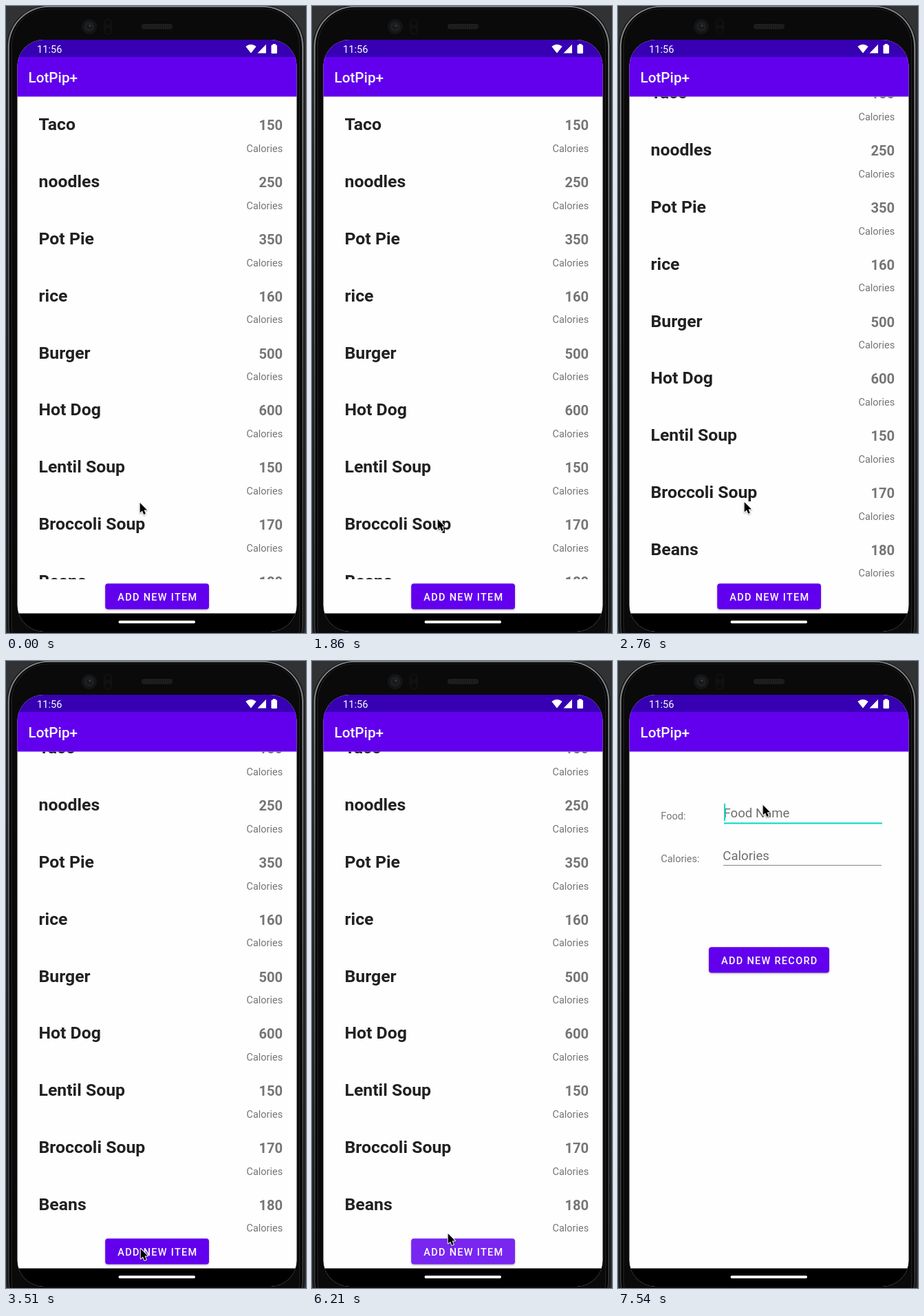
An HTML page with a canvas that plays this animation: 436x910 px, repeating every 7990 ms.

```html
<!DOCTYPE html>
<html lang="en">
<head>
<meta charset="utf-8">
<title>Calorie list</title>
<style>
html, body { margin: 0; width: 100%; height: 100%; overflow: hidden; background: #303234; }
canvas { display: block; width: 436px; height: 910px; }
</style>
</head>
<body>
<canvas id="stage"></canvas>
<script>
const W = 436, H = 910, LOOP = 7990;
const PURPLE = '#6200ee', GREY = '#757575', TEAL = '#03dac5';
const canvas = document.getElementById('stage');
const ctx = canvas.getContext('2d');
const dpr = window.devicePixelRatio || 1;
canvas.width = W * dpr;
canvas.height = H * dpr;

const foods = [
  ['Taco', 150], ['noodles', 250], ['Pot Pie', 350], ['rice', 160], ['Burger', 500],
  ['Hot Dog', 600], ['Lentil Soup', 150], ['Broccoli Soup', 170], ['Beans', 180]
];
const ROW = 82.8, LIST_TOP = 131.5, LIST_END = 832, MAX_SCROLL = 46, MAX_STRETCH = .0088;
const STEP = 150, PRESS_AT = 4560, RELEASE_AT = 5460, FORM_AT = 6350, FOCUS_AT = 7540;

// Turning points of the pointer: time, x, y
const stops = [
  [210, 195, 721], [810, 207, 547], [1110, 207, 547], [1560, 188, 670], [1860, 183, 745],
  [2160, 181, 690], [2310, 181, 690], [2460, 181, 687], [3510, 196, 853], [5310, 196, 853],
  [6210, 198, 831], [6500, 188, 705], [6650, 188, 705], [7240, 211, 209]
];

// Eased 0..1 between two times
function ramp(t, from, to) {
  const p = Math.min(1, Math.max(0, (t - from) / (to - from)));
  return p * p * (3 - 2 * p);
}

function stepped(t) {
  const phase = t < FORM_AT ? 60 : 50;
  return Math.floor((t - phase) / STEP) * STEP + phase;
}

function pointerAt(t) {
  let [from, x, y] = stops[0];
  for (const [to, nx, ny] of stops.slice(1)) {
    if (t <= from) break;
    const p = ramp(t, from, to);
    x += (nx - x) * p;
    y += (ny - y) * p;
    from = to;
  }
  return [x, y];
}

function rect(x, y, w, h, color) {
  ctx.fillStyle = color;
  ctx.fillRect(x, y, w, h);
}

function round(x, y, w, h, r, color) {
  ctx.beginPath();
  ctx.roundRect(x, y, w, h, r);
  ctx.fillStyle = color;
  ctx.fill();
}

function disc(x, y, r, color) {
  round(x - r, y - r, 2 * r, 2 * r, r, color);
}

function poly(points, color) {
  ctx.beginPath();
  points.forEach(([x, y]) => ctx.lineTo(x, y));
  ctx.closePath();
  ctx.fillStyle = color;
  ctx.fill();
}

function text(str, x, y, size, weight, color, align = 'left', spacing = 0) {
  ctx.font = `${weight} ${size}px Roboto, sans-serif`;
  ctx.letterSpacing = spacing + 'px';
  ctx.textAlign = align;
  ctx.fillStyle = color;
  ctx.fillText(str, x, y);
}

function drawPhone() {
  rect(0, 0, W, H, '#303234');
  const metal = ctx.createLinearGradient(0, 0, 0, H);
  metal.addColorStop(0, '#85878a');
  metal.addColorStop(.12, '#6c6e70');
  metal.addColorStop(.5, '#4a4b4d');
  metal.addColorStop(1, '#2c2d2e');
  const shell = (inset, color) =>
    round(1 + inset, inset * .7 - 1, 433 - 2 * inset, 960 - 1.4 * inset, 61 - inset, color);
  shell(0, '#111213');
  shell(1.5, metal);
  shell(4, '#000');
  shell(6.5, '#2a2b2c');
  shell(7.5, '#0a0a0b');

  disc(121, 30, 11, '#141516');
  disc(121, 30, 7, '#1e2022');
  disc(121, 30, 4, '#17191b');
  disc(122, 28.5, 1.8, '#33373b');
  round(142, 18, 12, 24, 6, '#111112');
  disc(148, 24, 4, '#0b0b0c');
  disc(148, 36, 4, '#0b0b0c');
  round(197, 26, 45, 7.5, 3.7, '#1f2021');
  for (let x = 200; x < 240; x += 3) rect(x, 27, 1, 5.5, '#161617');
}

function drawStatus() {
  rect(16, 49, 407, 25, '#3700b3');
  text('11:56', 45, 68, 14.6, 400, '#fff');
  ctx.beginPath();
  ctx.moveTo(356, 68.5);
  ctx.lineTo(348.3, 58.8);
  ctx.quadraticCurveTo(356, 52.6, 363.7, 58.8);
  ctx.fillStyle = '#fff';
  ctx.fill();
  poly([[365.5, 68.5], [378, 68.5], [378, 55.8]], '#fff');
  round(385.5, 56.5, 8.5, 12.5, 1.2, '#fff');
  rect(387.8, 55, 4, 2, '#fff');
}

function drawList(t) {
  const scroll = MAX_SCROLL * ramp(t, 1860, 2160);
  const stretch = MAX_STRETCH * ramp(t, 2010, 2460) * (1 - ramp(t, 2460, 2760));
  ctx.save();
  ctx.beginPath();
  ctx.rect(16, LIST_TOP, 407, LIST_END - LIST_TOP);
  ctx.clip();
  ctx.translate(0, LIST_END);
  ctx.scale(1, 1 + stretch);
  ctx.translate(0, -LIST_END - scroll);
  foods.forEach(([name, kcal], i) => {
    const y = i * ROW;
    text(name, 47.5, 180.4 + y, 24.8, 700, '#212121');
    text(kcal, 402.2, 180.4 + y, 20.2, 700, GREY, 'right');
    text('Calories', 402.2, 212 + y, 14.5, 400, GREY, 'right');
  });
  ctx.restore();
}

// Light spreading over a pressed button
function pressGlow(t) {
  if (t >= RELEASE_AT) return 'rgba(255,255,255,.15)';
  if (t >= PRESS_AT + STEP) return 'rgba(255,255,255,.2)';
  const glow = ctx.createRadialGradient(212, 857, 0, 212, 857, 86);
  glow.addColorStop(0, 'rgba(255,255,255,.22)');
  glow.addColorStop(.55, 'rgba(255,255,255,.2)');
  glow.addColorStop(1, 'rgba(255,255,255,.08)');
  return glow;
}

function drawButton(x, y, w, label, glow) {
  const h = 37.3;
  ctx.save();
  ctx.shadowColor = 'rgba(0,0,0,.28)';
  ctx.shadowBlur = 3 * dpr;
  ctx.shadowOffsetY = 1.2 * dpr;
  round(x, y, w, h, 4, PURPLE);
  ctx.restore();
  if (glow) round(x, y, w, h, 4, glow);
  text(label, x + w / 2 + .8, y + 24.3, 14.5, 500, '#fff', 'center', 1.3);
}

function drawForm(focused) {
  text('Food:', 62.3, 230.3, 14.5, 400, GREY);
  text('Calories:', 62.3, 291.6, 14.5, 400, GREY);
  text('Food Name', 153.5, 227, 18.6, 400, '#6e6e6e');
  text('Calories', 152.3, 289, 18.6, 400, '#6e6e6e');
  if (focused) {
    rect(154, 234.5, 230, 2, TEAL);
    rect(154, 207, 2, 25, TEAL);
  } else {
    rect(154, 235, 230, 1, '#858585');
  }
  rect(153, 296, 230, 1, '#858585');
  drawButton(132, 415.2, 175, 'ADD NEW RECORD');
}

function drawPointer(x, y) {
  ctx.save();
  ctx.translate(x - .3, y);
  ctx.beginPath();
  [[0, 0], [0, 14.6], [3.3, 11.5], [5.6, 16.9], [8.2, 15.8], [5.9, 10.6], [10.3, 10.4]]
    .forEach(([px, py]) => ctx.lineTo(px, py));
  ctx.closePath();
  ctx.lineJoin = 'round';
  ctx.lineWidth = 2;
  ctx.strokeStyle = '#fff';
  ctx.shadowColor = 'rgba(0,0,0,.35)';
  ctx.shadowBlur = 2 * dpr;
  ctx.shadowOffsetY = dpr;
  ctx.stroke();
  ctx.shadowColor = 'transparent';
  ctx.fillStyle = '#000';
  ctx.fill();
  ctx.restore();
}

function draw(t) {
  const tick = stepped(t);
  ctx.setTransform(dpr, 0, 0, dpr, 0, 0);
  drawPhone();
  ctx.save();
  ctx.beginPath();
  ctx.roundRect(16.5, 49, 406, 859, 38);
  ctx.clip();
  rect(16, 49, 407, 860, '#fefefe');
  drawStatus();
  rect(16, 74, 407, LIST_TOP - 74, PURPLE);
  text('LotPip+', 32.5, 111, 20.7, 500, '#fff');
  if (t < FORM_AT) {
    drawList(tick);
    drawButton(144.2, 838.2, 150.8, 'ADD NEW ITEM', t >= PRESS_AT && pressGlow(t));
  } else {
    drawForm(t >= FOCUS_AT);
  }
  rect(16, 881.5, 407, 28, '#000');
  round(163.5, 892, 111.5, 4, 2, '#fff');
  ctx.restore();
  drawPointer(...pointerAt(tick));
}

const start = performance.now();
function loop() {
  draw((performance.now() - start) % LOOP);
  requestAnimationFrame(loop);
}
loop();
</script>
</body>
</html>
```
